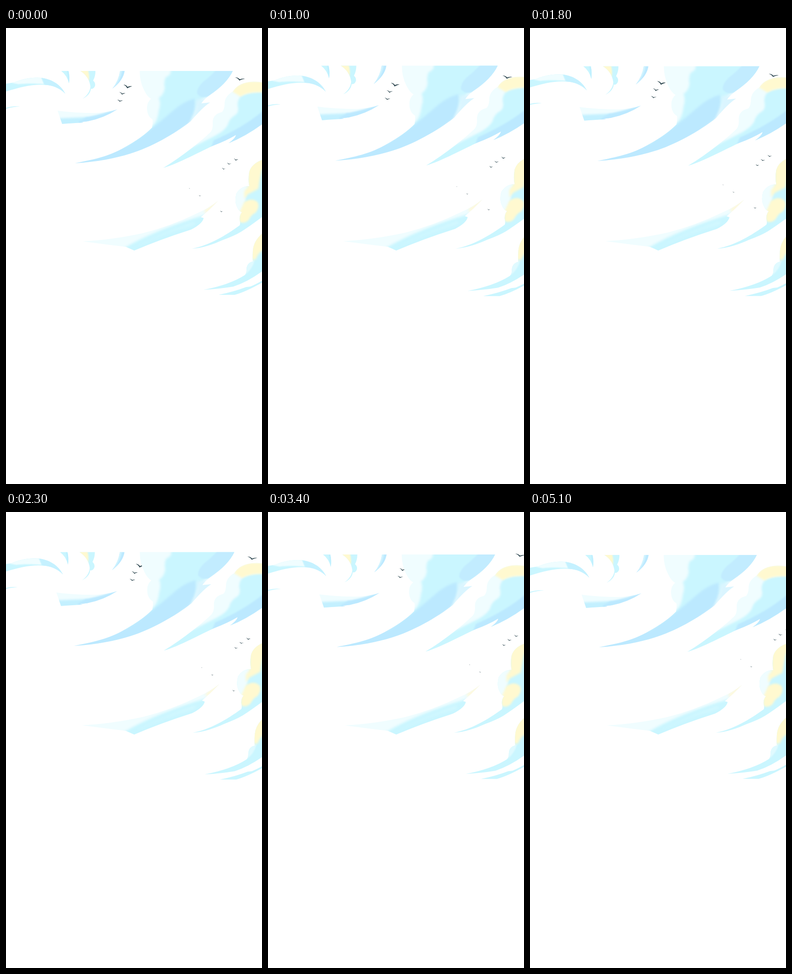
These frames come from a looping animation (561x998 px, 5.2 s). An HTML page with a canvas:

```html
<!DOCTYPE html>
<html>
<head>
<meta charset="utf-8">
<style>
html, body { margin: 0; width: 100%; height: 100%; overflow: hidden; background: #fff; }
canvas { display: block; }
</style>
</head>
<body>
<canvas id="stage" width="561" height="998"></canvas>
<script>
const ctx = document.getElementById('stage').getContext('2d');
const LOOP = 5200, STEP = 100;
const PALE = '#f0fdff', CYAN = '#caf6ff', BLUE = '#bce9ff', SOFT_BLUE = '#c2ecff',
      YELLOW = '#fff9d0', INK = '#2d464f';

// A cloud is an outline with a base colour and layers [path, colour, blur] clipped inside it.
const cloud = (outline, base, ...layers) => ({
  outline: new Path2D(outline), base,
  layers: layers.map(([d, color, blur]) => ({ path: new Path2D(d), color, blur }))
});

const leftClouds = [
  cloud('M-10 124L0 122L18 119C36 111 60 107 78 109C98 112 119 122 130 144C120 133 106 127 92 125C60 122 36 128 0 139L-10 142Z', CYAN,
    ['M12 120C36 109 60 106 77 108L84 123C62 121 44 121 28 123Z', PALE, 1],
    ['M78 108L84 124L132 146V120Z', '#c5f1ff', 1]),
  cloud('M-6 177Q14 169 31 172Q14 172 -6 179Z', CYAN)
];

const mainClouds = [
  cloud('M121 94H137Q140 108 138 121Q134 104 121 94Z', CYAN,
    ['M134 94H140V122H137Z', '#beefff', 1]),
  cloud('M163 94H196Q196 106 191 115Q198 122 194 129Q191 134 186 133Q185 146 168 155Q184 143 185 128Q182 106 163 94Z', CYAN,
    ['M160 92H180Q184 106 181 119Z', YELLOW, 1.5]),
  cloud('M250 94H260Q257 115 233 133Q247 115 250 94Z', BLUE,
    ['M246 92H254Q252 113 233 134Z', '#d4f5ff', 1.5]),
  cloud('M113 181Q150 186 195 186Q222 185 244 178Q215 197 180 204L163 206L170 207Q150 208 123 210Z', PALE,
    ['M110 198L180 195V213H110Z', '#c3f0ff', 2],
    ['M176 195Q215 188 250 174V214H160V204Z', BLUE, 1.5]),
  cloud('M293 94H497Q484 122 445 148Q433 157 428 165L447 163Q430 174 405 204C370 232 315 262 272 275C240 285 200 293 151 296C190 288 225 282 262 260Q300 239 320 218Q322 206 321 200Q309 193 309 175Q309 162 318 155Q310 151 303 137Q293 118 293 94Z', PALE,
    ['M361 90V96Q361 103 350 108Q345 119 348 131Q346 146 335 153Q340 166 335 180Q333 202 322 214L250 270L300 275L410 190L425 160L510 90Z', CYAN, 2.5],
    ['M462 90Q450 104 432 118Q417 132 419 144Q428 156 446 149L510 100V90Z', SOFT_BLUE, 1],
    ['M413 155Q390 160 365 182Q315 226 264 258L140 290V300H280L400 210Q419 184 413 155Z', BLUE, 2],
    ['M416 157Q418 180 404 203L455 168V155Z', '#daf5ff', 3]),
  cloud('M561 119Q548 116 533 118Q507 122 497 139Q478 150 479 168Q478 180 473 184Q452 189 453 208Q454 222 447 229Q430 245 408 262Q375 288 345 306C375 298 430 268 455 257Q482 247 504 234Q503 241 488 252Q530 235 570 204V119Z', PALE,
    ['M580 140Q530 138 514 150Q506 160 508 171Q511 184 503 190Q489 198 486 212Q480 224 460 235L330 300V320H580Z', CYAN, 2],
    ['M580 166Q535 211 455 246L444 275L500 265L580 225Z', BLUE, 1.5],
    ['M496 139Q506 121 533 117H580V142Q533 137 514 150Z', YELLOW, 2]),
  cloud('M168 467Q230 464 300 449Q360 434 420 405Q445 394 465 378Q445 399 427 414L433 416Q431 428 406 441L400 443Q340 462 281 487Q270 482 263 479Q220 474 168 467Z', PALE,
    ['M258 482Q330 440 440 408V440L285 495Z', CYAN, 2.5],
    ['M285 478Q340 449 415 423L412 431Q350 448 292 476Z', '#d4f8ff', 3],
    ['M434 399L470 373V385L440 407Z', '#fff8da', 3]),
  cloud('M575 285Q540 292 533 315Q530 332 533 346Q515 346 505 362Q500 380 507 393Q511 402 517 403Q511 410 512 420Q514 428 512 432C480 455 445 476 407 483C430 482 455 473 475 464Q500 455 515 446Q540 430 575 403Z', CYAN,
    ['M500 345H533Q525 358 525 376L518 405H500Z', PALE, 2],
    ['M575 280H530V348L522 358V374L530 364L553 352Q556 330 561 310L575 300Z', YELLOW, 2.5],
    ['M522 381Q539 370 551 381Q557 391 547 404Q537 409 532 420Q522 430 511 424V405Z', YELLOW, 2]),
  cloud('M575 440Q543 460 541 487Q540 505 541 511Q527 514 527 530Q527 537 523 541Q490 562 433 573Q468 571 498 566Q535 554 575 522Z', CYAN,
    ['M520 508H545Q540 528 524 540Z', '#e0faff', 1.5],
    ['M580 430H535V507L547 507Q553 492 561 488L580 475Z', YELLOW, 2.5]),
  cloud('M466 584Q500 577 526 567L535 566Q550 560 575 545V549Q530 576 501 584Z', CYAN)
];

const birdShape = new Path2D('M-9.5-4Q-4-4-.5 1Q3-1.5 9.5-.5Q3 1-1.5 4Q-3.5-1.5-9.5-4Z');
// x, y, width, height factor
const birds = [
  [267, 128, 20, 1], [255, 143, 14, 1], [250, 159, 13, .9], [513, 111.5, 23, .75],
  [504, 288, 10, 1.1], [489, 297, 10, .9], [477, 308, 8, 1.1],
  [402, 351, 2, 2], [425, 367, 5, 1.2], [472, 401.5, 6, 1.2]
];

// Progress of each group's swell or drift, sampled every 600 ms.
const mainSwell = [0, .58, 1, .81, .43, .19, .05, 0, 0, 0];
const leftDrift = [0, .3, .75, .98, .93, .65, .37, .12, .02, 0];

function sample(keys, t) {
  const i = Math.floor(t / 600), u = t / 600 - i;
  const at = k => keys[Math.max(0, Math.min(keys.length - 1, k))];
  const [a, b, c, d] = [at(i - 1), at(i), at(i + 1), at(i + 2)];
  return b + u / 2 * (c - a + u * (2 * a - 5 * b + 4 * c - d + u * (3 * (b - c) + d - a)));
}

function drawClouds(clouds) {
  for (const { outline, base, layers } of clouds) {
    ctx.save();
    ctx.fillStyle = base;
    ctx.fill(outline);
    ctx.clip(outline);
    for (const { path, color, blur } of layers) {
      ctx.filter = `blur(${blur}px)`;
      ctx.fillStyle = color;
      ctx.fill(path);
    }
    ctx.restore();
  }
}

function drawMain(t) {
  const scale = 1 + .032 * sample(mainSwell, t);
  ctx.save();
  ctx.translate(280, 487);
  ctx.scale(scale, scale);
  ctx.translate(-280, -487);
  drawClouds(mainClouds);
  ctx.restore();
}

function drawLeft(t) {
  const drift = sample(leftDrift, t);
  ctx.save();
  ctx.translate(-5.5 * drift, -7.5 * drift);
  drawClouds(leftClouds);
  ctx.restore();
}

function drawBirds(seconds) {
  const dx = 11.75 * seconds, dy = -(3.7 + .37 * seconds) * seconds;
  ctx.fillStyle = INK;
  for (const [x, y, width, tall] of birds) {
    ctx.save();
    ctx.translate(x + dx, y + dy);
    ctx.scale(width / 20, width / 20 * tall);
    ctx.fill(birdShape);
    ctx.restore();
  }
}

let shown = -1;
function frame() {
  const t = Math.floor(performance.now() % LOOP / STEP) * STEP;
  if (t !== shown) {
    shown = t;
    ctx.clearRect(0, 0, 561, 998);
    drawBirds(t / 1000);
    drawMain(t);
    drawLeft(t);
  }
  requestAnimationFrame(frame);
}
frame();
</script>
</body>
</html>
```
